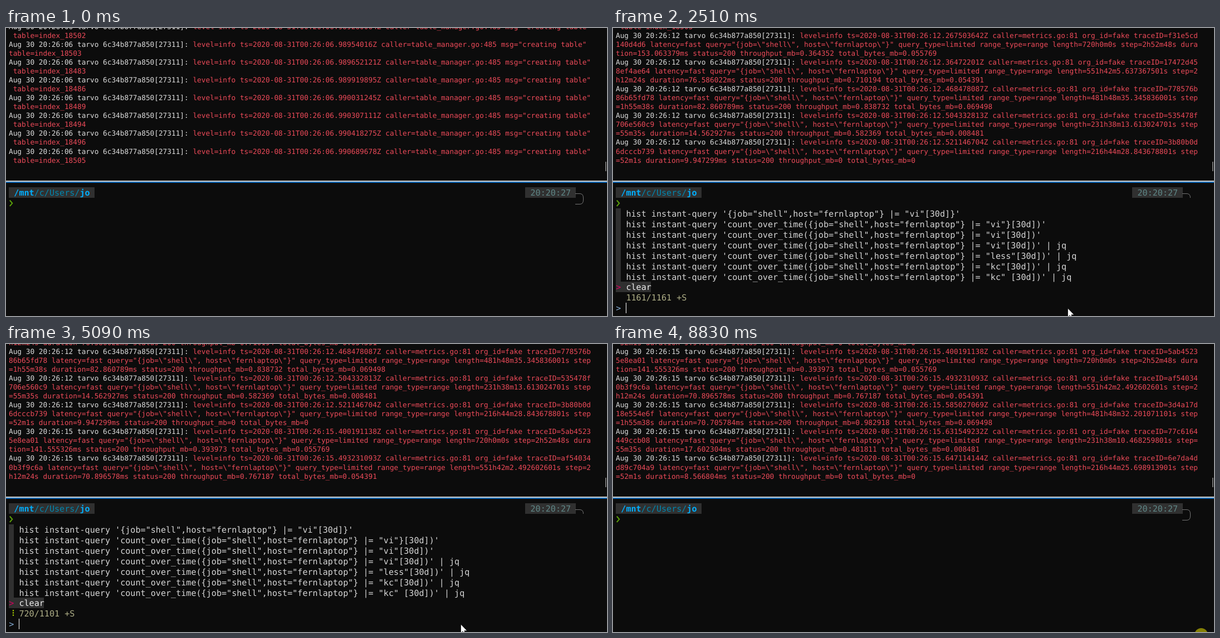
Recreate the animation shown at these times as an HTML page with a canvas. Size 1079x519 px, loop 8.91 s.

```html
<!DOCTYPE html>
<html lang="en">
<head>
<meta charset="utf-8">
<title>Shell history search</title>
<style>
  html, body { margin: 0; width: 100%; height: 100%; overflow: hidden; background: #0c0c0c; }
  canvas { display: block; }
</style>
</head>
<body>
<canvas id="stage" width="1079" height="519"></canvas>
<script>
const ctx = document.getElementById('stage').getContext('2d');
const LOOP = 8910;
const FONT = '"DejaVu Sans Mono", "DejaVu Sans", monospace';
const LOG = { x: 5, dx: 7.684, dy: 16.07, size: 12.76 };
const SH = { x: 5.2, dx: 9.09, dy: 18.9, top: 287.3, size: 15.1 };

// ---- upper pane: log rows, wrapped at 136 columns ----
const tables = `06.989280064 18502
06.98954016 18503
06.989652121 18483
06.989919895 18486
06.990031245 18489
06.990307111 18494
06.990418275 18496
06.990689678 18505`;
const metrics = `12.267503642 f31e5cd140d4d6 720h0m0s 2h52m48s 153.063379 0.364352 0.055769
12.36472201 17472d458ef4ae64 551h42m5.637367501s 2h12m24s 76.586022 0.710194 0.054391
12.468478087 778576b86b65fd78 481h48m35.345836001s 1h55m38s 82.860789 0.838732 0.069498
12.504332813 535478f706e560c9 231h38m13.613024701s 55m35s 14.562927 0.582369 0.008481
12.521146704 3b80b0d6dcccb739 216h44m28.843678801s 52m1s 9.947299 0 0
15.400191138 5ab45235e8ea01 720h0m0s 2h52m48s 141.555326 0.393973 0.055769
15.493231093 af540340b3f9c6a 551h42m2.492602601s 2h12m24s 70.896578 0.767187 0.054391
15.585027069 3d4a17d18e554e6f 481h48m32.201071101s 1h55m38s 70.705784 0.982918 0.069498
15.631549232 77c6164449ccb08 231h38m10.468259801s 55m35s 17.602304 0.481811 0.008481
15.647114144 6e7da4dd89c704a9 216h44m25.698913901s 52m1s 8.566804 0 0`;

const logRows = [];
function addLog(sec, rest) {
  const head = `Aug 30 20:26:${sec.slice(0, 2)} tarvo 6c34b877a850[27311]: `;
  const line = `${head}level=info ts=2020-08-31T00:26:${sec}Z ${rest}`;
  for (let i = 0; i < line.length; i += 136)
    logRows.push({ text: line.slice(i, i + 136), head: i ? 0 : head.length });
}
for (const line of tables.split('\n')) {
  const [sec, id] = line.split(' ');
  addLog(sec, `caller=table_manager.go:485 msg="creating table" table=index_${id}`);
}
const tableRows = logRows.length;
for (const line of metrics.split('\n')) {
  const [sec, id, len, step, dur, rate, bytes] = line.split(' ');
  addLog(sec, `caller=metrics.go:81 org_id=fake traceID=${id} latency=fast ` +
    `query="{job=\\"shell\\", host=\\"fernlaptop\\"}" query_type=limited range_type=range ` +
    `length=${len} step=${step} duration=${dur}ms status=200 throughput_mb=${rate} total_bytes_mb=${bytes}`);
}

// ---- lower pane: result lists ----
const sel = `{job="shell",host="fernlaptop"} |= `;
const count = tail => `hist instant-query 'count_over_time(${sel}${tail}`;
const find = tail => `hist query '${sel}"docker${tail}`;
const ex = '--exclude-label=';
const link = name => `ln -s ~/Downloads/kubectx/completion/${name}.zsh ~/.oh-my-zsh/completions/_${name}.zsh`;
const watch = "watch 'kubectl get po | grep ingester'";

const recent = [
  `hist instant-query '${sel}"vi"[30d]}'`,
  count(`"vi"}[30d])'`), count(`"vi"[30d])'`), count(`"vi"[30d])' | jq`),
  count(`"less"[30d])' | jq`), count(`"kc"[30d])' | jq`), count(`"kc" [30d])' | jq`),
  'clear'];
const docker = [
  'docker ps -a', 'docker start grafana',
  find(''), find('" --since=999h --forward'), find(`"' --since=999h --forward | fzf`),
  find(`"' --since=999h --forward`), find(`"' --since=999h --forward --quiet`),
  find(`"' --since=999h --forward --quiet | fzf`)];
const kube = [
  'which kubectx', 'cd kubectx', link('kubectx'), link('kubens'),
  'ls /home/jo/.oh-my-zsh/completions/_kubectx.zsh',
  'less /home/jo/.oh-my-zsh/completions/_kubectx.zsh', '/kubectx', watch];
const kubectl = [
  `..lename" ${ex}"pod_template_hash" ${ex}"pod" ${ex}"container" --colored-output`,
  `.. ${ex}"pod_template_hash" ${ex}"pod" ${ex}"container" ${ex}"job"..`,
  link('kubectx'), link('kubens'), "watch 'kubectl get po | grep gw'",
  'kubectl.1.15 rollout restart deployment cortex-gw',
  'kubectl.1.15 rollout restart daemonset promtail', watch];

// ---- timeline: each step changes part of the state ----
const closed = { q: null, list: [], info: '', spin: '', caret: 1 };
const steps = [
  [0, { ...closed, logs: 0, caret: 0, mouse: null }],
  [460, { caret: 1 }],
  [780, { mouse: [819, 511] }],
  [850, { mouse: [816.5, 505] }],
  [930, { caret: 0 }],
  [1410, { caret: 1 }],
  [1660, { q: '' }],
  [1730, { info: '0/0', spin: '⠋' }],
  [1880, { spin: '⠹' }],
  [1960, { spin: '⠸' }],
  [2030, { spin: '⠼', logs: 1, list: recent, info: '720/1101' }],
  [2110, { spin: '⠴' }],
  [2190, { spin: '⠦', logs: 2 }],
  [2340, { spin: '⠇', logs: 3 }],
  [2420, { spin: '⠏', logs: 5 }],
  [2500, { spin: '', info: '1161/1161' }],
  [2580, { q: 'd', list: docker, info: '785/1161' }],
  [2660, { q: 'do', info: '521/1161' }],
  [2740, { q: 'doc', info: '206/1161' }],
  [2890, { q: 'dock', info: '84/1161' }],
  [2970, { q: 'docke', info: '81/1161' }],
  [3040, { q: 'docker', info: '80/1161' }],
  [3590, { caret: 0 }],
  [3770, { caret: 1 }],
  [4230, closed],
  [4780, { q: '' }],
  [4860, { info: '0/0', spin: '⠋' }],
  [4930, { spin: '⠙' }],
  [5010, { spin: '⠹', logs: 6, list: recent, info: '720/1101' }],
  [5090, { spin: '⠸', logs: 7 }],
  [5170, { spin: '⠼', logs: 8 }],
  [5250, { spin: '', logs: 10, q: 'k', list: kube, info: '402/1161' }],
  [5330, { q: 'ku', info: '175/1161' }],
  [5400, { q: 'kub', info: '152/1161' }],
  [5570, { q: 'kube', info: '139/1161' }],
  [5720, { q: 'kubec', info: '98/1161' }],
  [5950, { q: 'kubect', info: '86/1161' }],
  [6110, { q: 'kubectl', list: kubectl, info: '36/1161' }],
  [6670, { caret: 0 }],
  [7250, { caret: 1 }],
  [7880, closed],
  [8130, { mouse: [816.5, 511] }],
  [8220, { mouse: null }],
  [8600, { caret: 0 }],
  [8830, { dot: 1 }]
];
const states = [];
steps.forEach(([, change], i) => states.push({ ...states[i - 1], ...change }));

// ---- drawing ----
function rect(x, y, w, h, color) {
  ctx.fillStyle = color;
  ctx.fillRect(x, y, w, h);
}

// One glyph per grid cell; color is a value or a function of the index.
function write(grid, col, base, text, color, bold) {
  ctx.font = `${bold ? 'bold ' : ''}${grid.size}px ${FONT}`;
  [...text].forEach((ch, i) => {
    if (ch === ' ') return;
    ctx.fillStyle = typeof color === 'function' ? color(i) : color;
    ctx.fillText(ch, grid.x + (col + i) * grid.dx, base);
  });
}

const rowY = row => Math.round(SH.top + row * SH.dy);
const put = (row, col, text, color, bold) => write(SH, col, rowY(row) + 15, text, color, bold);
function band(row, col, len, color) {
  const x = Math.floor(SH.x + col * SH.dx), end = Math.floor(SH.x + (col + len) * SH.dx);
  rect(x, rowY(row), end - x, rowY(row + 1) - rowY(row), color);
}

// Fuzzy match: scan forward to the end, then back for the shortest span.
function match(line, q) {
  const hits = new Set();
  if (line.startsWith('..')) q = q.slice(1);
  let at = -1;
  for (const c of q) {
    at = line.indexOf(c, at + 1);
    if (at < 0) return hits;
  }
  for (const c of [...q].reverse()) {
    at = line.lastIndexOf(c, at);
    hits.add(at--);
  }
  return hits;
}

function drawLogs(n) {
  const rows = logRows.slice(0, tableRows + 3 * n).slice(-16).reverse();
  rows.forEach(({ text, head }, i) =>
    write(LOG, 0, Math.round(242.6 - i * LOG.dy), text, k => k < head ? '#dcdcdc' : '#ec4a59'));
  rect(1076, 241, 1.5, 17, '#909090');
  rect(0, 275, 1079, 2, '#cccccc');
  rect(0, 277, 1079, 2, '#0f6cbd');
}

function drawPrompt(open) {
  band(0, 0, 17, '#303030');
  put(0, 1, '/mnt', '#00afff', true);
  put(0, 5, '/c/Users/', '#0087af');
  put(0, 14, 'jo', '#00afff', true);
  band(0, 102, 10, '#303030');
  put(0, 103, '20:20:27', '#5f8787');
  ctx.lineWidth = 1;
  ctx.strokeStyle = '#767676';
  ctx.beginPath();
  ctx.moveTo(1022, 298.5);
  ctx.lineTo(1030, 298.5);
  ctx.quadraticCurveTo(1036.5, 298.5, 1036.5, 306);
  if (open) {
    ctx.lineTo(1036.5, 310);
    ctx.quadraticCurveTo(1036.5, 317.5, 1030, 317.5);
    ctx.lineTo(1022, 317.5);
  }
  ctx.stroke();
  ctx.lineWidth = 2;
  ctx.strokeStyle = '#5a9e0a';
  ctx.beginPath();
  ctx.moveTo(6.8, 310.5);
  ctx.lineTo(11.3, 315.8);
  ctx.lineTo(6.8, 321);
  ctx.stroke();
}

function drawFinder({ q, list, info, spin }) {
  list.forEach((line, i) => {
    const row = i + 2, chosen = i === 7, hits = match(line, q);
    band(row, 0, chosen ? line.length + 2 : 1, '#303030');
    if (chosen) put(row, 0, '>', '#d7005f');
    const plain = chosen ? '#eeeeee' : '#d6d6d6', hit = chosen ? '#afd7af' : '#87af87';
    put(row, 2, line, k => hits.has(k) ? hit : plain);
  });
  put(10, 0, spin, '#afd700');
  if (info) put(10, 2, info + ' +S', '#afaf87');
  put(11, 0, '>', '#87afd7');
  put(11, 2, q, '#f0f0f0', true);
}

function drawMouse([x, y]) {
  ctx.beginPath();
  for (const [dx, dy] of [[0, 0], [0, 16], [3.6, 12.8], [6, 18], [8.6, 17], [6.4, 11.8], [11.4, 11.8]])
    ctx.lineTo(x + dx, y + dy);
  ctx.closePath();
  ctx.fillStyle = '#ffffff';
  ctx.fill();
  ctx.lineWidth = 0.7;
  ctx.strokeStyle = '#000000';
  ctx.stroke();
}

function draw(s) {
  const finding = s.q !== null;
  rect(0, 0, 1079, 519, '#0c0c0c');
  drawLogs(s.logs);
  drawPrompt(!finding);
  if (finding) drawFinder(s);
  if (s.caret) {
    const col = 2 + (finding ? s.q.length : 0);
    rect(Math.floor(SH.x + col * SH.dx), rowY(finding ? 11 : 1), 1, 19, '#ffffff');
  }
  if (s.mouse) drawMouse(s.mouse);
  if (s.dot) {
    ctx.fillStyle = '#858006';
    ctx.beginPath();
    ctx.arc(1056, 524, 12, 0, 7);
    ctx.fill();
  }
}

ctx.textRendering = 'geometricPrecision';
let shown = -1;
function tick() {
  const t = performance.now() % LOOP;
  const now = steps.findLastIndex(([start]) => start <= t);
  if (now !== shown) draw(states[shown = now]);
  requestAnimationFrame(tick);
}
tick();
</script>
</body>
</html>
```
